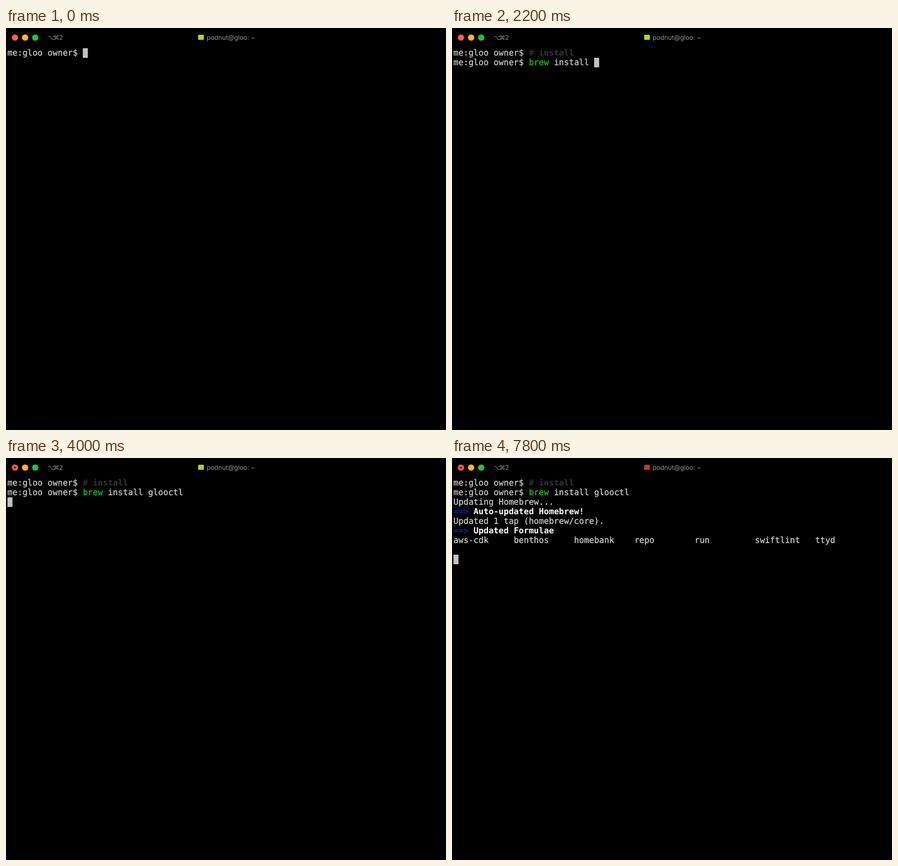
These frames come from a looping animation (783x715 px, 8000 ms). An HTML page:

```html
<!DOCTYPE html>
<html lang="en">
<head>
<meta charset="utf-8">
<title>Terminal</title>
<style>
  html, body { margin: 0; width: 100%; height: 100%; overflow: hidden; background: #000; }
  svg { display: block; text-rendering: geometricPrecision; }
  .bar { font: 11.4px Inter, "Open Sans", sans-serif; fill: #939393; }
  .keys { font: 11px "DejaVu Sans", sans-serif; fill: #8a8a8a; }
  #screen { font: 14.85px "DejaVu Sans Mono", monospace; color: #d2d2d2; }
  #screen text { fill: currentColor; stroke: currentColor; stroke-width: .25; }
  #screen .note { color: #333; font-weight: bold; stroke: none; }
  #screen .cmd { color: #1fca24; }
  #screen .arrow { color: #182bac; }
  #screen .head { color: #fff; font-weight: bold; stroke: none; }
  #cursor { fill: #c2c2c2; }
  #icon { fill: #bfd016; }
  #icon.git { fill: #e9623c; }
  #icon.ruby { fill: #c5372f; }
</style>
</head>
<body>
<svg width="783" height="715" viewBox="0 0 783 715">
  <rect width="783" height="715"/>
  <circle cx="16" cy="17" r="5.6" fill="#fc5b53"/>
  <circle id="busy" cx="16" cy="17" r="1.9" fill="#7c0f0c"/>
  <circle cx="34" cy="17" r="5.6" fill="#fdb42d"/>
  <circle cx="52" cy="17" r="5.6" fill="#20c536"/>
  <text class="keys" x="74 84 94.5" y="20.5">⌥⌘2</text>
  <rect id="icon" x="342" y="12" width="10" height="9" rx="1"/>
  <text class="bar" x="357" y="20.5">podnut@gloo: ~</text>
  <g id="screen"></g>
  <rect id="cursor" width="8.94" height="17"/>
</svg>
<script>
const LOOP = 8000, CELL = 8.94, ROW = 17, LEFT = 2.6, TOP = 36, BASE = 13.2;
const prompt = ['', 'me:gloo owner$ '];
const arrow = ['arrow', '==> '];

// Each row is a list of [class, text] runs.
const rows = [
  [prompt, ['note', '# install']],
  [prompt, ['cmd', 'brew '], ['', 'install glooctl']],
  [['', 'Updating Homebrew...']],
  [arrow, ['head', 'Auto-updated Homebrew!']],
  [['', 'Updated 1 tap (homebrew/core).']],
  [arrow, ['head', 'Updated Formulae']],
  [['', 'aws-cdk benthos homebank repo run swiftlint ttyd'
    .split(' ').map(name => name.padEnd(12)).join('')]]
];

// Text before the cursor is visible: [time, row, column, icon, busy].
const steps = [
  [0, 0, 15], [400, 0, 18], [600, 0, 21], [800, 0, 24],
  [1200, 1, 15], [1400, 1, 17], [1600, 1, 20], [1800, 1, 23], [2000, 1, 25], [2200, 1, 28],
  [2400, 1, 31], [2600, 1, 33], [2800, 1, 35], [3000, 2, 0],
  [3200, 2, 0, '', true], [3400, 2, 0, 'git', true], [4000, 2, 0, '', true],
  [4400, 3, 0, '', true], [4800, 3, 0, 'git', true],
  [6800, 7, 0, 'ruby', true], [7000, 8, 0, 'ruby', true]
];

const byId = id => document.getElementById(id);
const screen = byId('screen'), cursor = byId('cursor'), icon = byId('icon'), busy = byId('busy');
const words = [];

rows.forEach((runs, row) => {
  let start = 0;
  for (const [style, text] of runs) {
    for (const match of text.matchAll(/\S+/g)) {
      const col = start + match.index;
      const node = document.createElementNS('http://www.w3.org/2000/svg', 'text');
      node.setAttribute('class', style);
      node.setAttribute('x', LEFT + col * CELL);
      node.setAttribute('y', TOP + row * ROW + BASE);
      screen.append(node);
      words.push({ node, row, col, text: match[0] });
    }
    start += text.length;
  }
});

let shown;

function show(step) {
  const [, row, col, mark = '', running = false] = step;
  for (const word of words) {
    const count = word.row < row ? word.text.length
      : word.row > row ? 0 : Math.max(0, col - word.col);
    word.node.textContent = word.text.slice(0, count);
  }
  cursor.setAttribute('x', LEFT + col * CELL);
  cursor.setAttribute('y', TOP + row * ROW);
  icon.setAttribute('class', mark);
  busy.style.visibility = running ? 'visible' : 'hidden';
}

function tick() {
  const time = performance.now() % LOOP;
  const step = steps.filter(([at]) => at <= time).pop();
  if (step !== shown) show(shown = step);
  requestAnimationFrame(tick);
}
tick();
</script>
</body>
</html>
```
